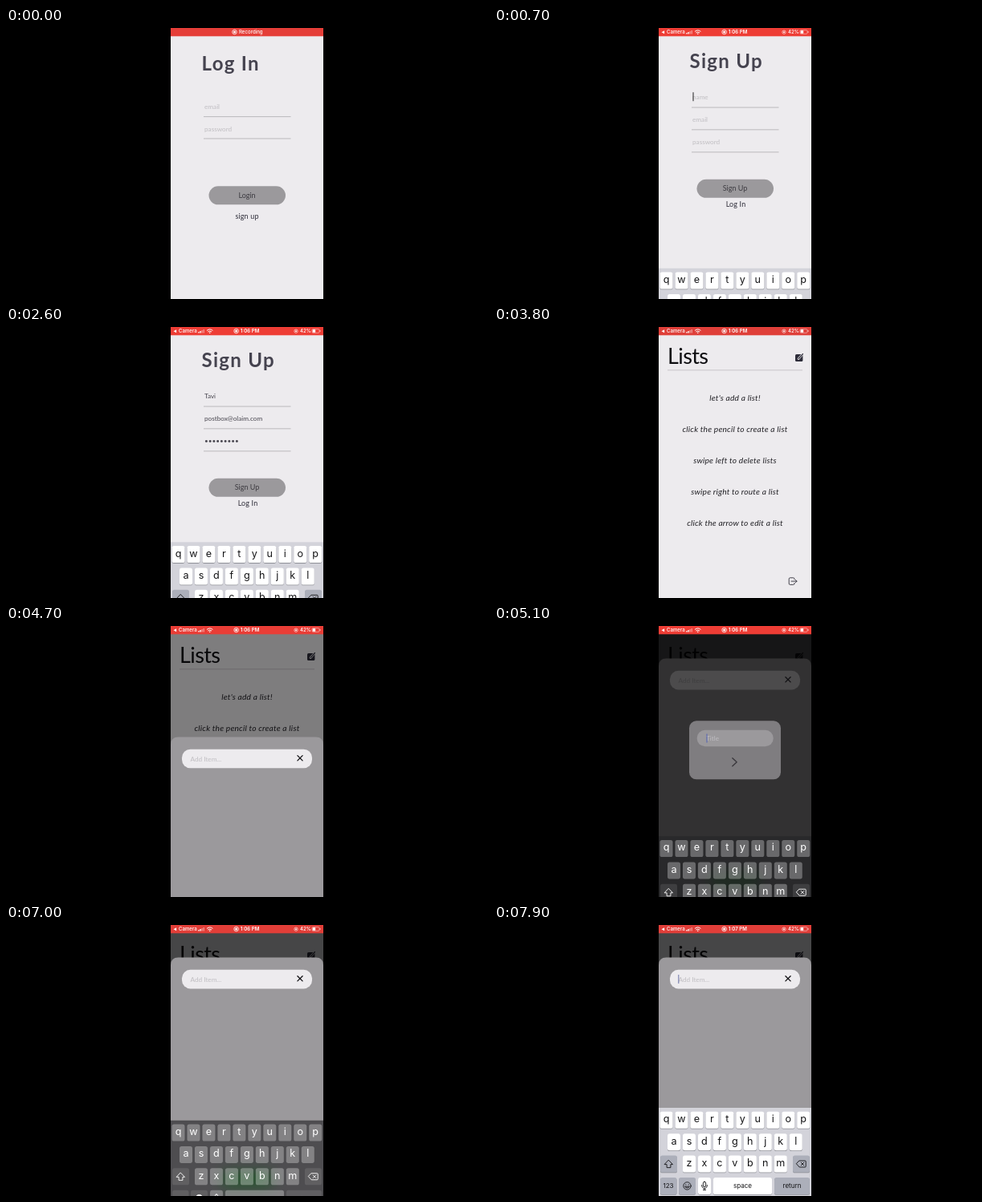
Write an HTML page that moves like this. It is 600 px wide and 338 px high and loops after 8000 ms.

```html
<!DOCTYPE html>
<html lang="en">
<head>
<meta charset="utf-8">
<title>List app walkthrough</title>
<style>
html, body { margin: 0; width: 100%; height: 100%; overflow: hidden; background: #000; }
svg { display: block; width: 100vw; height: 100vh; }
text { font-family: Lato, "Open Sans", sans-serif; font-size: 8.2px; fill: #48464f; white-space: pre; }
.mid { text-anchor: middle; }
.title { font-size: 24px; font-weight: 700; letter-spacing: 1.3px; fill: #45434f; }
.hint { fill: #c0bec2; }
.btn { font-size: 9px; fill: #3d3b41; }
.link { font-size: 9px; letter-spacing: .15px; fill: #2f2e3a; }
.heading { font-size: 27px; letter-spacing: -.6px; fill: #0d0d10; }
.tip { font-size: 10.2px; font-style: italic; letter-spacing: .2px; fill: #222126; }
.bar text, .kb text { font-family: Inter, Roboto, sans-serif; }
.bar text { font-size: 6.1px; fill: #fff; font-weight: 500; }
.kb text { font-size: 12.6px; text-anchor: middle; }
.kb text.small { font-size: 8.1px; }
.kb text.big { font-size: 18.5px; }
.line { fill: none; stroke-width: .9; stroke-linecap: round; stroke-linejoin: round; }
.light text { fill: #151517; }
.light .board { fill: #d3d3da; }
.light .key, .light .pop { fill: #fff; }
.light .alt { fill: #acafba; }
.light .shade { fill: #8f9097; }
.light .line { stroke: #151517; }
.light .face { fill: none; }
.light .pop { filter: drop-shadow(0 .5px 1.5px rgba(0,0,0,.35)); }
.dark text { fill: #fff; }
.dark .board { fill: rgba(38,38,40,.65); }
.dark .key { fill: rgba(255,255,255,.3); }
.dark .alt { fill: rgba(255,255,255,.1); }
.dark .shade { fill: none; }
.dark .pop { fill: #757477; }
.dark .line { stroke: #fff; }
.dark .face { fill: #fff; }
.dark .feature { stroke: #3a393c; }
</style>
</head>
<body>
<svg id="stage" viewBox="0 0 600 338" preserveAspectRatio="none"></svg>
<script>
const LOOP = 8000, STEP = 100, LEFT = 205, WIDTH = 190;
const PAPER = '#edebee', GREY = '#9b999c', KB_HEIGHT = 112;

// Markup helpers
const rect = (x, y, w, h, fill, r = 0, more = '') =>
  `<rect x="${x}" y="${y}" width="${w}" height="${h}" rx="${r}" fill="${fill}" ${more}/>`;
const block = (x, y, w, h, cls, r) =>
  `<rect class="${cls}" x="${x}" y="${y}" width="${w}" height="${h}" rx="${r}"/>`;
const label = (x, y, str, cls = '', id = '') =>
  `<text x="${x}" y="${y}" class="${cls}" ${id && `id="${id}"`}>${str}</text>`;
const group = (id, body, cls = '') => `<g id="${id}" class="${cls}">${body}</g>`;
const stroke = (d, color, w = 1) =>
  `<path d="${d}" fill="none" stroke="${color}" stroke-width="${w}" stroke-linecap="round" stroke-linejoin="round"/>`;
const paper = () => rect(LEFT, 0, WIDTH, 338, PAPER);
const rule = y => rect(246, y, 108.5, .9, '#b5b3b7');
const caret = (id, y, color) => rect(0, y, 1, 11, color, 0, `id="${id}"`);
const field = (id, y, hint) =>
  label(247, y, hint, 'hint', id + 'Hint') + label(247, y, '', '', id) + rule(y + 9.4);

// Keyboard
const ROWS = [
  { keys: 'qwertyuiop', x: 214.5, y: 232.8 },
  { keys: 'asdfghjkl', x: 224, y: 260.2 },
  { keys: 'zxcvbnm', x: 243, y: 287.5 }
];
const KEY_W = 16, KEY_H = 21, PITCH = 18.97;

function keyAt(ch) {
  const row = ROWS.find(r => r.keys.includes(ch));
  return row && { x: row.x + row.keys.indexOf(ch) * PITCH, y: row.y };
}

function keyCap(x, y, w, cls) {
  return block(x, y + .8, w, KEY_H, 'shade', 2.6) + block(x, y, w, KEY_H, cls, 2.6);
}

function keyboard(theme) {
  let s = block(LEFT, 228, WIDTH, 112, 'board', 0);
  for (const row of ROWS) for (const ch of row.keys) {
    const k = keyAt(ch);
    s += keyCap(k.x - KEY_W / 2, k.y, KEY_W, 'key') + label(k.x, k.y + 13.4, ch);
  }
  const y = 315;
  s += keyCap(207, 287.5, 21, 'alt') + keyCap(372, 287.5, 21, 'alt');
  s += keyCap(207, y, 20.5, 'alt') + keyCap(230, y, 21, 'alt') + keyCap(254, y, 16, 'key');
  s += keyCap(273, y, 73, 'key') + keyCap(349, y, 44, 'alt');
  s += label(217, 328, '123', 'small') + label(309.5, 328, 'space', 'small') + label(371, 328, 'return', 'small');
  s += '<path class="line" d="M217.5 293.4l5 5.2h-2.6v4h-4.8v-4h-2.6z"/>';
  s += '<path class="line" d="M380.2 294h7q1 0 1 1v6q0 1-1 1h-7l-3.6-4zM382.2 296.2l3.6 3.6m0-3.6l-3.6 3.6"/>';
  s += '<circle class="line face" cx="240.5" cy="325.4" r="4.7"/>';
  s += '<path class="line feature" d="M238.8 323.6v.5m3.4-.5v.5m-4.4 2.4q2.7 3.2 5.4 0z"/>';
  s += '<path class="line" d="M262 320.2q1.7 0 1.7 1.7v3q0 1.7-1.7 1.7t-1.7-1.7v-3q0-1.7 1.7-1.7zM258.6 324.4q0 4 3.4 4t3.4-4M262 328.4v2m-1.6 0h3.2"/>';
  return group(theme, s + group(theme + 'Pops', ''), 'kb ' + theme);
}

function popup(ch) {
  const k = keyAt(ch);
  if (!k) return '';
  const { x, y } = k;
  const d = `M${x - 10} ${y - 33}h20q5 0 5 5v18q0 4-3.500 6.500t-3.500 6v15.500q0 3-3 3h-10q-3 0-3-3` +
    `v-15.500q0-3.500-3.500-6t-3.500-6.500v-18q0-5 5-5z`;
  return `<path class="pop" d="${d}"/>` + label(x, y - 11.5, ch, 'big');
}

// Screens
const login = group('login', paper() + label(243.5, 53, 'Log In', 'title') +
  label(247, 101, 'email', 'hint') + rule(110.2) +
  label(247, 128.6, 'password', 'hint') + rule(137.5) +
  rect(252.5, 197.3, 95.5, 23, GREY, 11.5) + label(300, 211.6, 'Login', 'btn mid') +
  label(300, 238.4, 'sign up', 'link mid'));

const signup = group('signup', paper() + label(243.5, 50, 'Sign Up', 'title') +
  field('name', 89.2, 'name') + field('mail', 117, 'email') + field('pass', 145, 'password') +
  caret('formCaret', 0, '#222') +
  rect(252.5, 188.8, 95.5, 23, GREY, 11.5) + label(300, 203, 'Sign Up', 'btn mid') +
  label(301, 223, 'Log In', 'link mid'));

const tips = ["let's add a list!", 'click the pencil to create a list', 'swipe left to delete lists',
  'swipe right to route a list', 'click the arrow to edit a list'];
const lists = group('lists', paper() + label(216, 46, 'Lists', 'heading') +
  rect(216, 53.4, 168, .9, '#c3c1c5') +
  rect(375, 34, 9.4, 9, '#2d2c39', 1.6) +
  stroke('M379 39.600l5-5.600', PAPER, 2.6) + stroke('M379.200 39.400l5.200-5.800', '#2d2c39', 1.3) +
  tips.map((s, i) => label(300, 92 + i * 39, s, 'tip mid')).join('') +
  stroke('M374 314.800v-.6q0-1.400-1.400-1.400h-4q-1.400 0-1.400 1.400v5.800q0 1.400 1.400 1.400h4q1.400 0 1.400-1.400v-.6' +
    'M370 317.100h7m-1.800-1.800l1.800 1.800-1.800 1.800', '#33323b', .9));

const sheet = group('sheet', `<path d="M205 338V50q0-9.500 9.500-9.500h171q9.500 0 9.500 9.500V338z" fill="${GREY}"/>` +
  rect(267, 306, 66, 22, '#35b044', 11, 'id="save"') +
  rect(219, 55.800, 162, 23.600, PAPER, 10.5) + label(229.5, 70.6, 'Add Item...', 'hint') +
  caret('itemCaret', 62, '#6d74a8'));

const modal = group('modal', rect(243, 118.3, 114, 73, '#7f7d80', 9) +
  rect(252.700, 129.800, 95, 20.400, GREY, 10) +
  label(264, 142.8, 'Title', 'hint', 'listHint') + label(264, 142.8, '', '', 'list') +
  caret('listCaret', 134.500, '#5263b4') + stroke('M296.800 164.700l5.400 5-5.400 5', '#39373b', 1.3));

const record = x => `<circle cx="${x}" cy="5" r="2.800" fill="none" stroke="#fff" stroke-width=".8"/>` +
  `<circle cx="${x}" cy="5" r="1.500" fill="#fff"/>`;
const status = group('status', rect(LEFT, 0, WIDTH, 10.3, '#e0403a', 0, 'id="red"') +
  group('recording', record(284.5) + label(290, 7.300, 'Recording')) +
  group('info', '<path d="M208.500 5.200l3.600-2v4z" fill="#fff"/>' + label(215, 7.300, 'Camera') +
    [0, 1, 2, 3].map(i => rect(239.200 + i * 2.1, 6 - i, 1.4, 1.500 + i, '#fff', .3,
      i > 1 ? 'opacity=".45"' : '')).join('') +
    stroke('M250.300 4.200q3.400-2.900 6.800 0M251.700 5.800q2-1.600 4 0', '#fff', 1) +
    '<circle cx="253.700" cy="7.200" r=".8" fill="#fff"/>' + record(286.600) +
    '<text id="clock" x="291.800" y="7.300" style="font-weight:600"></text>' +
    '<circle cx="361" cy="5.200" r="2.200" fill="none" stroke="#fff" stroke-width=".6"/>' +
    rect(360.1, 4.500, 1.8, 1.500, '#fff') + label(366, 7.300, '42%') +
    rect(381, 2.600, 9, 4.800, 'none', 1.200, 'stroke="#fff" stroke-width=".6" stroke-opacity=".7"') +
    rect(381.700, 3.300, 3.500, 3.400, '#fff', .5) + rect(390.600, 4.200, .8, 1.600, '#fff')), 'bar');

const stage = document.getElementById('stage');
stage.innerHTML = `<clipPath id="phone">${rect(LEFT, 0, WIDTH, 338, '#000')}</clipPath>` +
  rect(0, 0, 600, 338, '#000') + '<g clip-path="url(#phone)">' + login + signup + lists +
  rect(LEFT, 0, WIDTH, 338, '#000', 0, 'id="shadeBack"') + sheet +
  rect(LEFT, 0, WIDTH, 338, '#000', 0, 'id="shadeFront"') +
  stroke('M362.900 63.700l6.200 6.200m0-6.200l-6.200 6.200', '#121114', 1.3).replace('<path', '<path id="cross"') +
  modal + keyboard('light') + keyboard('dark') + status + '</g>';

// Motion
const el = {};
stage.querySelectorAll('[id]').forEach(n => el[n.id] = n);
const ramp = (t, a, b) => Math.min(1, Math.max(0, (t - a) / (b - a)));
const easeOut = p => 1 - (1 - p) ** 2;
const easeIn = p => p * p;
const show = (id, on) => el[id].style.display = on ? '' : 'none';
const shift = (id, x, y) => el[id].setAttribute('transform', `translate(${x} ${y})`);
const alpha = (id, a) => el[id].setAttribute('opacity', a);

const ENTRIES = [
  { id: 'name', text: 'Tavi', start: 900, gap: 70 },
  { id: 'mail', text: 'postbox@olaim.com', start: 1200, gap: 50 },
  { id: 'pass', text: 'waterlily', start: 2060, gap: 45, hidden: true },
  { id: 'list', text: 'Groceries', start: 5800, gap: 100 }
];
const GLOW = [[0, .3], [1700, 1], [3800, .1], [5100, .6], [6000, .3], [7000, .2], [8000, .15]];

function glowAt(t) {
  const i = GLOW.findIndex(p => p[0] > t);
  const [a, b] = [GLOW[i - 1], GLOW[i]];
  return a[1] + (b[1] - a[1]) * ramp(t, a[0], b[0]);
}

function placeCaret(id, text) {
  el[id].setAttribute('x', +text.getAttribute('x') + text.getComputedTextLength() + .5);
}

function typing(t) {
  const pops = { lightPops: '', darkPops: '' };
  for (const e of ENTRIES) {
    const n = Math.max(0, Math.min(e.text.length, Math.floor((t - e.start) / e.gap) + 1));
    el[e.id].textContent = e.hidden ? '•'.repeat(n) : e.text.slice(0, n);
    show(e.id + 'Hint', !n);
    if (e.hidden) continue;
    [...e.text.toLowerCase()].forEach((ch, i) => {
      const at = e.start + i * e.gap;
      if (t >= at - 55 && t <= at + 30) pops[e.id === 'list' ? 'darkPops' : 'lightPops'] += popup(ch);
    });
  }
  for (const id in pops) el[id].innerHTML = pops[id];

  const active = t < 1200 ? 'name' : t < 2050 ? 'mail' : 'pass';
  placeCaret('formCaret', el[active]);
  el.formCaret.setAttribute('y', el[active].getAttribute('y') - 9);
  show('formCaret', t >= 700 && t < 2500);
  placeCaret('listCaret', el.list);
  show('listCaret', t >= 5000);
}

function render(t) {
  const g = glowAt(t);
  el.red.setAttribute('fill', `rgb(${220 + 30 * g},${63 - 4 * g},${58 - 8 * g})`);
  show('recording', t < 300);
  show('info', t >= 300);
  el.clock.textContent = t < 7400 ? '1:06 PM' : '1:07 PM';

  shift('signup', WIDTH * (1 - easeOut(ramp(t, 300, 600))), 0);
  shift('lists', WIDTH * (1 - easeOut(ramp(t, 2800, 3200))), 0);

  const open = easeOut(ramp(t, 4550, 4900));
  shift('sheet', 0, 300 * (1 - open));
  shift('cross', 0, 300 * (1 - open));
  alpha('shadeBack', .7 * open);
  const dim = ramp(t, 4750, 5000) - ramp(t, 6650, 6900);
  alpha('shadeFront', .68 * dim);
  alpha('modal', dim);
  show('modal', dim > 0);

  const light = easeOut(ramp(t, 650, 900)) - easeIn(ramp(t, 2450, 2700)) + easeOut(ramp(t, 7350, 7700));
  const dark = easeOut(ramp(t, 4930, 5310)) - easeIn(ramp(t, 6880, 7200));
  shift('light', 0, KB_HEIGHT * (1 - light));
  shift('dark', 0, KB_HEIGHT * (1 - dark));
  show('light', light > 0);
  show('dark', dark > 0);
  el.save.style.filter = dark > 0 ? 'blur(8px)' : '';

  typing(t);
  el.itemCaret.setAttribute('x', 229.3);
  show('itemCaret', t >= 7500);
}

const begin = performance.now();
function tick() {
  const t = (performance.now() - begin) % LOOP;
  render(Math.floor(t / STEP) * STEP);
  requestAnimationFrame(tick);
}
tick();
</script>
</body>
</html>
```
